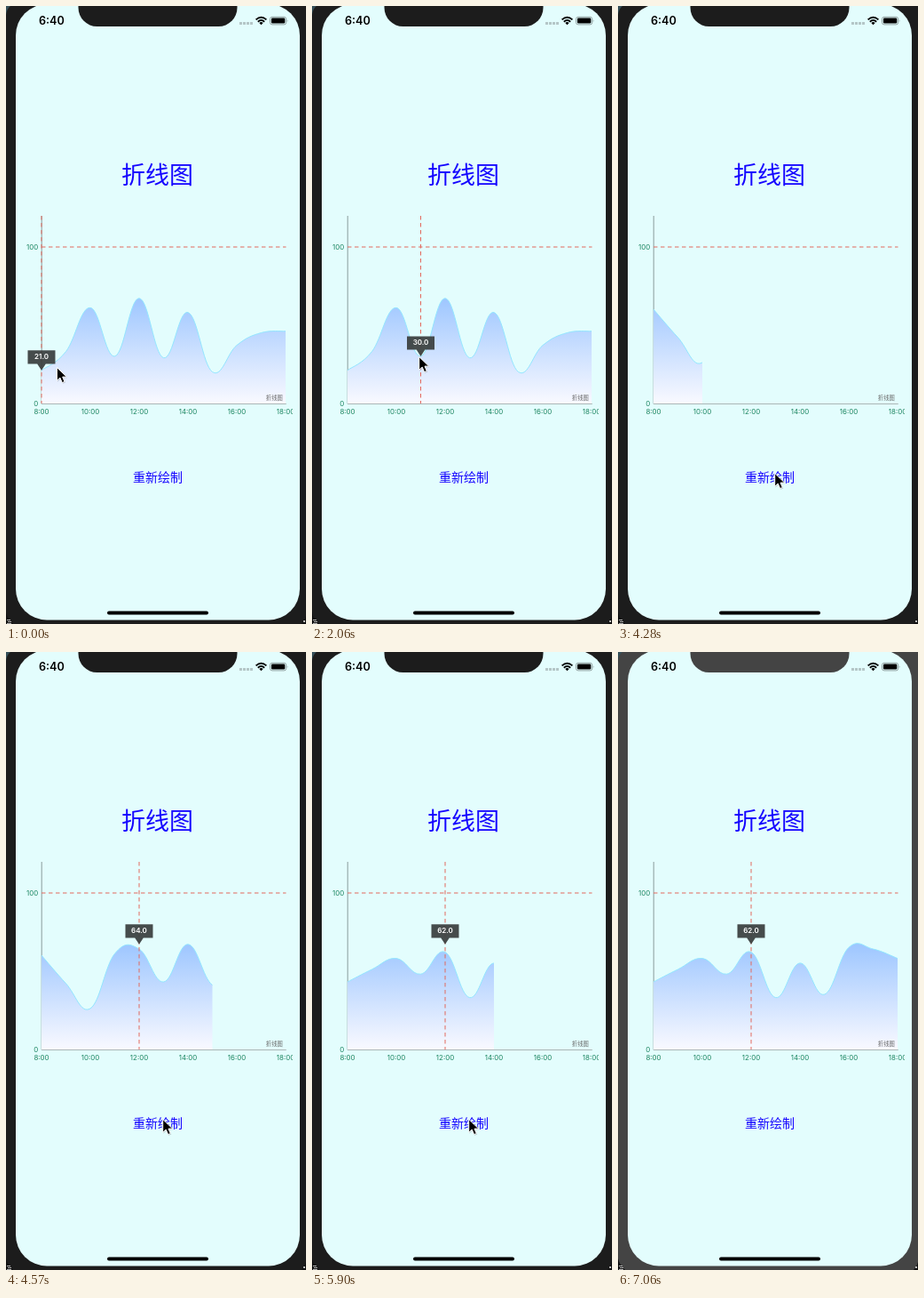
Write an HTML page that moves like this. It is 338 px wide and 695 px high and loops after 7.16 s.

```html
<!DOCTYPE html>
<html lang="zh-CN">
<head>
<meta charset="utf-8">
<style>
  html, body { margin: 0; width: 100%; height: 100%; overflow: hidden; background: #1c1c1c; }
  svg { display: block; width: 338px; height: 695px; }
  text { font-family: Inter, Roboto, "Noto Sans", sans-serif; }
  .cjk { font-family: "Noto Sans CJK SC", "Noto Sans CJK", sans-serif; text-anchor: middle; fill: #1505ff; }
  .tick { font-size: 7.9px; fill: #1c8560; }
  .dash { stroke: #e2685c; stroke-dasharray: 4.5 3.5; }
</style>
</head>
<body>
<svg viewBox="0 0 338 695" xmlns="http://www.w3.org/2000/svg">
  <defs>
    <linearGradient id="fade" gradientUnits="userSpaceOnUse" x1="0" y1="328" x2="0" y2="447">
      <stop offset="0" stop-color="#9dc6ff"/>
      <stop offset="1" stop-color="#f9f9ff"/>
    </linearGradient>
    <clipPath id="chart"><rect x="11" y="230" width="312" height="240"/></clipPath>
  </defs>

  <!-- Phone -->
  <rect id="bezel" width="338" height="695"/>
  <path d="M0 0H5Q1 3 0 10Z" fill="#35505a"/>
  <path d="M0 682Q2 690 8 695H0Z" fill="#111"/>
  <path d="M1 690.5H5M2 692.5H6M1 694.5H6" stroke="#ccc" stroke-width=".9"/>
  <path d="M338 686Q337 691 333 695H338Z" fill="#111"/>
  <rect x="335" y="691" width="2" height="2" fill="#bbb"/>
  <rect x="11" y="-2" width="320" height="692.5" rx="35" fill="#e3fdfd"/>
  <path id="notch" d="M81.5 0V2A21 21 0 0 0 102.5 23H239.5A21 21 0 0 0 260.5 2V0Z"/>
  <rect x="114" y="680.4" width="114" height="4" rx="2"/>

  <!-- Status bar -->
  <text x="37" y="21" font-size="12.6" font-weight="600">6:40</text>
  <path d="M263 19.5H278" stroke="#b4c6c7" stroke-width="3" stroke-dasharray="3 1"/>
  <g fill="none" stroke="#000" stroke-width="1.9">
    <path d="M281.6 15.4Q287.5 10.2 293.4 15.4"/>
    <path d="M283.8 17.7Q287.5 14.5 291.2 17.7"/>
  </g>
  <path d="M285.3 19Q287.5 17.2 289.7 19L287.5 21.2Z"/>
  <rect x="297.5" y="12.3" width="18.2" height="8.6" rx="2.4" fill="none" stroke="#8a9898" stroke-width=".9"/>
  <rect x="298.9" y="13.6" width="15.4" height="6" rx="1.3"/>
  <path d="M316.8 15.2Q318.2 16.6 316.8 18Z" fill="#8a9898"/>

  <text class="cjk" x="170.5" y="199.7" font-size="27">折线图</text>
  <text class="cjk" x="171" y="534.8" font-size="14">重新绘制</text>

  <!-- Chart -->
  <g clip-path="url(#chart)">
    <path d="M40.2 236V447.5H315.5" fill="none" stroke="#8b9b9b"/>
    <path class="dash" d="M40 271H315.5"/>
    <path id="area" fill="url(#fade)"/>
    <path id="line" fill="none" stroke="#93e6ff"/>
    <path d="M40 447.5H315.5" stroke="#b4bebe" stroke-width=".8"/>
    <g id="ticks"></g>
    <text class="cjk" x="302.3" y="442.5" font-size="6.3" style="fill:#666">折线图</text>
  </g>
  <g id="mark">
    <path class="dash" d="M0 236V447"/>
    <g id="tip">
      <path d="M-15.5 -22.5H15.5V-7.3H4.8L0 0L-4.8 -7.3H-15.5Z" fill="#3c4141" fill-opacity=".94"/>
      <text id="value" y="-13" font-size="8" font-weight="600" text-anchor="middle" fill="#fff"></text>
    </g>
  </g>
  <g id="cursor">
    <path d="M1 1.5V16.5L4.5 13.2L7 18.8L10 17.6L7.7 12.2H12.2Z" opacity=".18"/>
    <path d="M.4 .5V15.3L3.9 12.1L6.3 17.6L9 16.5L6.7 11.1H11.4Z" stroke="#fff" stroke-linejoin="round"/>
  </g>
</svg>
<script>
const LOOP = 7160;
const STEP = 147.08;      // ms between screen refreshes
const REVEAL = 6.4;       // refreshes a redraw takes
const FADE_STEP = 48;     // refresh at which the bezel lightens

const $ = id => document.getElementById(id);
const place = (id, x, y) => $(id).setAttribute("transform", `translate(${x} ${y})`);
const px = hour => 40 + 27.5 * hour;
const py = value => 446.7 - 1.76 * value;
const clamp = (v, low, high) => Math.max(low, Math.min(high, v));

// Hourly readings from 8:00, redrawn at each tap on the button
const SERIES = [
  { start: -REVEAL, values: [21, 33, 61, 30, 67, 29, 58, 20, 37, 45, 46] },
  { start: 26.7, values: [60, 42, 26, 61, 64, 43, 67, 41, 45, 22, 29] },
  { start: 36, values: [43, 51, 58, 48, 62, 33, 55, 35, 65, 64, 58] }
];

// Pointer moves; the hour touched is selected two refreshes after arrival
const MOVES = [
  { from: 1, to: 4, x: 79.5, y: 397, hour: 2 },
  { from: 6, to: 12, x: 120.3, y: 394, hour: 3 },
  { from: 14, to: 18, x: 157.3, y: 381.5, hour: 4 },
  { from: 20, to: 25, x: 176.3, y: 525, hour: 4 },
  { from: 42, to: 44, x: 195, y: 712, hour: 4 }
];

function pointerAt(step) {
  let x = 57, y = 406, hour = 0;
  for (const move of MOVES) {
    const k = clamp((step - move.from) / (move.to - move.from), 0, 1);
    x += (move.x - x) * k;
    y += (move.y - y) * k;
    if (step >= move.to + 2) hour = move.hour;
  }
  return { x, y, hour };
}

// Smooth curve whose tangents follow the neighbouring points
function curve(values, count) {
  const near = i => clamp(i, 0, values.length - 1);
  const handle = (i, sign) => {
    const a = near(i - 1), b = near(i + 1);
    return [px(i + sign * 0.2 * (b - a)), py(values[i] + sign * 0.2 * (values[b] - values[a]))];
  };
  let d = `M${px(0)} ${py(values[0])}`;
  for (let i = 1; i <= count; i++) {
    d += `C${[...handle(i - 1, 1), ...handle(i, -1), px(i), py(values[i])].join(" ")}`;
  }
  return d;
}

function addTick(label, x, y, anchor) {
  const text = document.createElementNS("http://www.w3.org/2000/svg", "text");
  text.setAttribute("class", "tick");
  text.setAttribute("x", x);
  text.setAttribute("y", y);
  text.setAttribute("text-anchor", anchor);
  text.textContent = label;
  $("ticks").append(text);
}

for (let i = 0; i <= 10; i += 2) addTick(`${8 + i}:00`, px(i), 458.6, "middle");
addTick("100", 36.2, 273.6, "end");
addTick("0", 36.2, 449.8, "end");

function draw(t) {
  const step = Math.floor(t / STEP);
  const { start, values } = SERIES.filter(s => s.start <= step).pop();
  const phase = (1 - Math.cos(Math.PI * clamp((step - start) / REVEAL, 0, 1))) / 2;
  const count = Math.floor(10 * phase);

  const path = count ? curve(values, count) : "";
  $("line").setAttribute("d", path);
  $("area").setAttribute("d", path && `${path}V447H40Z`);

  // The callout keeps the height at which its hour was first picked
  const { x, y, hour } = pointerAt(step);
  place("cursor", x, y);
  place("mark", px(hour), 0);
  place("tip", 0, py(SERIES[0].values[hour]));
  $("mark").setAttribute("visibility", hour < 11 * phase ? "visible" : "hidden");
  $("value").textContent = values[hour].toFixed(1);

  const shade = step >= FADE_STEP ? "#444" : "#1c1c1c";
  $("bezel").setAttribute("fill", shade);
  $("notch").setAttribute("fill", shade);
}

const begin = performance.now();
function tick() {
  draw((performance.now() - begin) % LOOP);
  requestAnimationFrame(tick);
}
tick();
</script>
</body>
</html>
```
